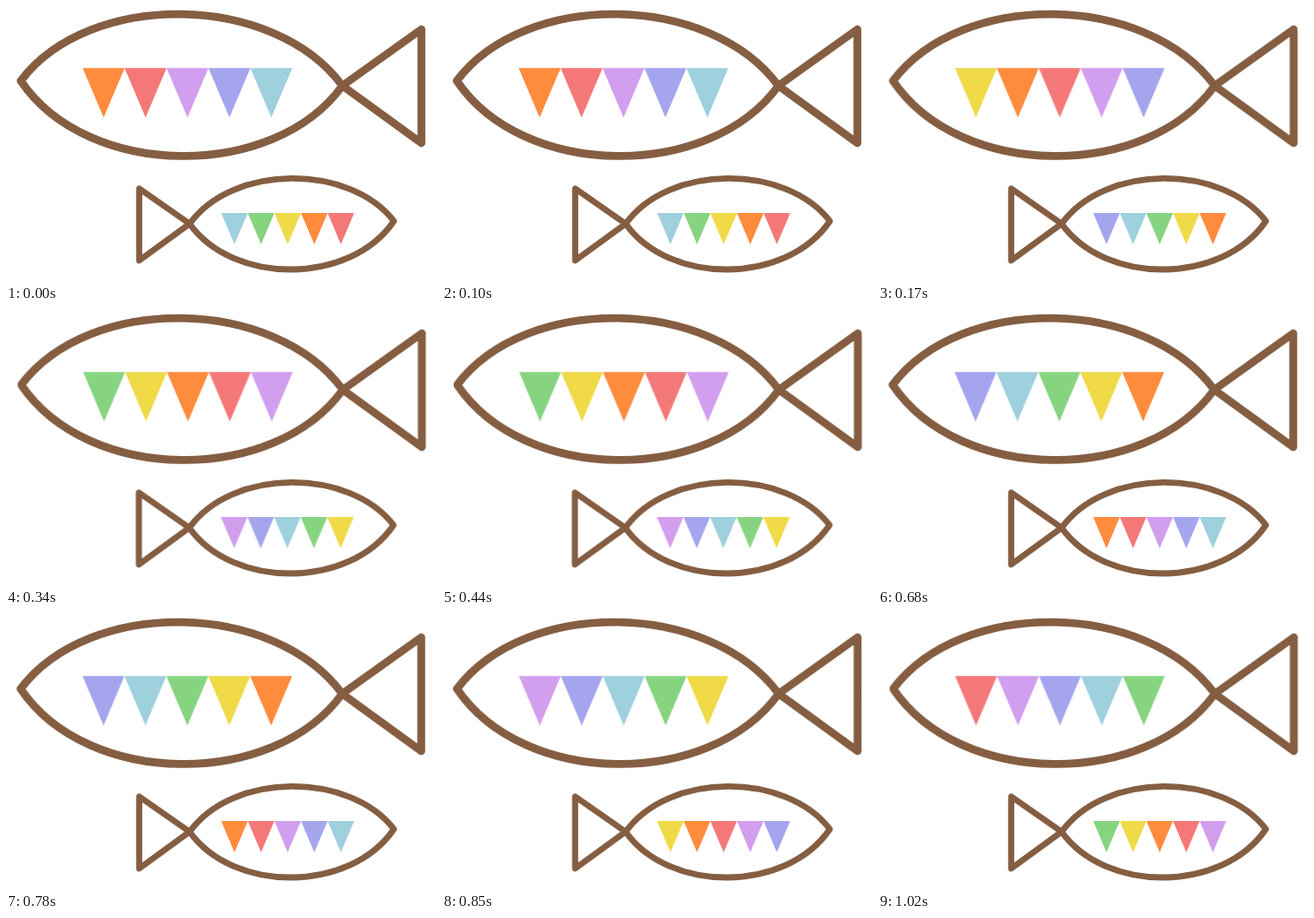
These frames come from a looping animation (480x308 px, 1190 ms). An HTML page:

```html
<!DOCTYPE html>
<html lang="en">
<head>
<meta charset="utf-8">
<title>Bunting fish</title>
<style>
  html, body { margin: 0; width: 100%; height: 100%; overflow: hidden; background: #fff; }
  svg { display: block; width: 480px; height: 308px; }
  .outline { fill: none; stroke: #855e42; stroke-linejoin: round; stroke-linecap: round; }
</style>
</head>
<body>
<svg viewBox="0 0 480 308">
  <g id="big">
    <path class="outline" stroke-width="8.8" d="M16.5 83.5C93-18 299-15 375.5 89C299 195 91 194 16.5 83.5Z"/>
    <path class="outline" stroke-width="8.8" d="M375.5 89L463.7 26V153Z"/>
  </g>
  <g id="small">
    <path class="outline" stroke-width="6.8" d="M205 243C253 176 384 176 433 240C384 312 253 311 205 243Z"/>
    <path class="outline" stroke-width="6.8" d="M205 243L148.7 203.8V284Z"/>
  </g>
</svg>
<script>
const STEP = 170;
const COLORS = ['#ff8b3c', '#f57878', '#d29eee', '#a5a5ee', '#9fd0de', '#86d480', '#f0da48'];
const COUNT = COLORS.length;

// Holds each value for one step, then loops.
function cycle(el, prop, values) {
  const frames = [...values, values[0]].map(v => ({ [prop]: v, easing: 'steps(1, end)' }));
  el.animate(frames, { duration: STEP * COUNT, iterations: Infinity });
}

function addFlags(fish, { x, y, w, h, first }) {
  for (let i = 0; i < 5; i++) {
    const flag = document.createElementNS('http://www.w3.org/2000/svg', 'path');
    flag.setAttribute('d', `M${x + i * w} ${y}h${w}l${-w / 2} ${h}Z`);
    fish.append(flag);
    cycle(flag, 'fill', COLORS.map((_, k) => COLORS[(first + i - k + COUNT) % COUNT]));
  }
}

function sway(fish, offsets) {
  cycle(fish, 'transform', offsets.map(dx => `translate(${dx}px, 0px)`));
}

const big = document.getElementById('big');
const small = document.getElementById('small');
addFlags(big, { x: 85.6, y: 69.2, w: 46.8, h: 55.2, first: 0 });
addFlags(small, { x: 240.2, y: 231, w: 29.7, h: 35, first: 4 });
sway(big, [0, 0.3, 0.5, 0.7, -0.2, 0.2, 0.5]);
sway(small, [0, 0, -0.4, -0.2, 0, -0.1, 0]);
</script>
</body>
</html>
```
